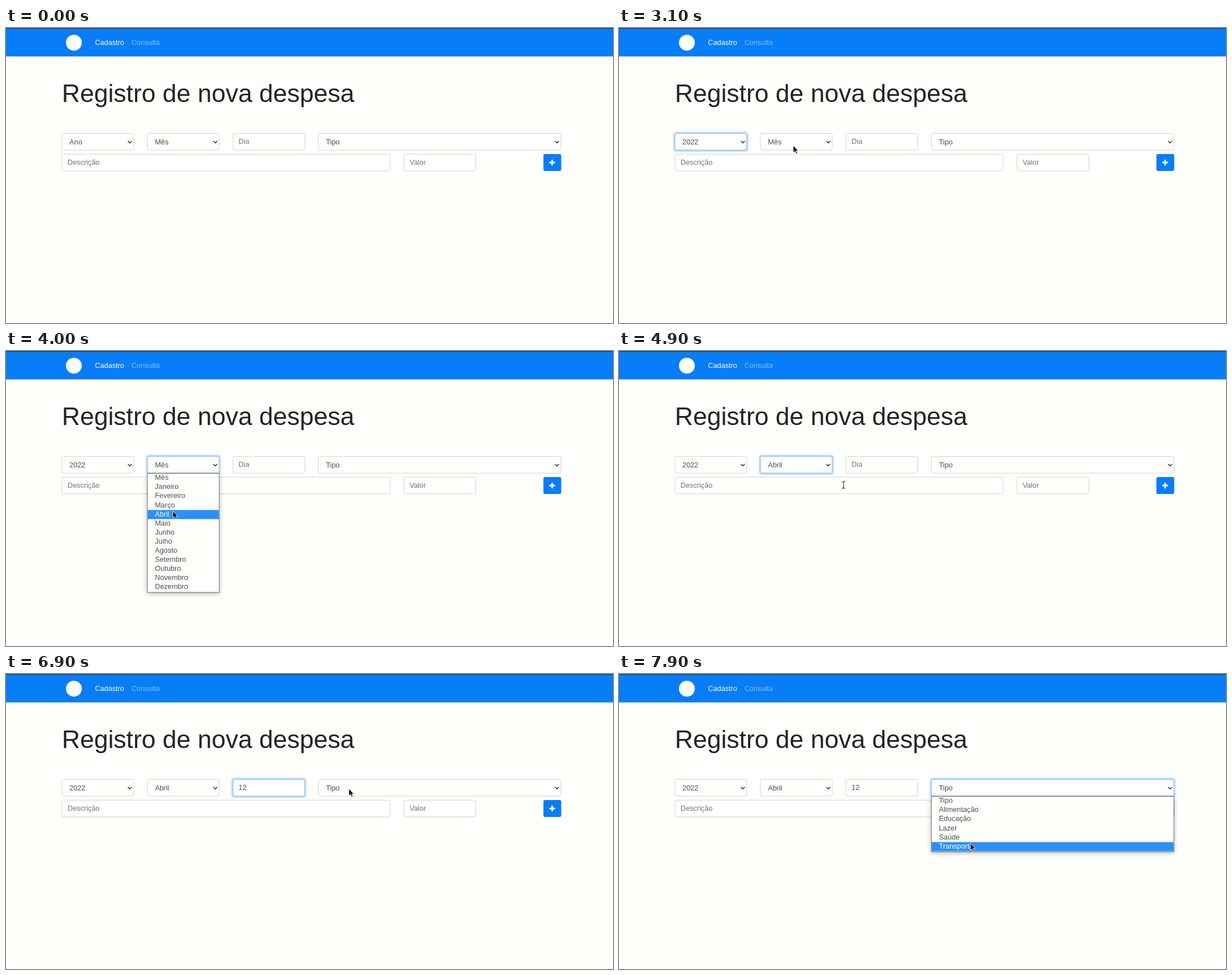
Recreate the animation shown at these times as an HTML page. Size 1073x522 px, loop 8000 ms.

```html
<!DOCTYPE html>
<html lang="pt-BR">
<head>
<meta charset="utf-8">
<style>
  html, body { margin: 0; width: 100%; height: 100%; overflow: hidden; background: #fffffc; }
  svg { display: block; font: 12.73px "Liberation Sans", Arial, sans-serif; fill: #495057; }
  .field { fill: #fffffc; stroke: #ced4da; }
  .hint { fill: #6c757d; }
  .chevron { fill: none; stroke: #343a40; stroke-width: 1.6; }
  .popup { fill: #fffffc; stroke: #6b6b6b; filter: drop-shadow(0 2px 4px rgba(0,0,0,.28)); }
</style>
</head>
<body>
<svg id="stage" width="1073" height="522" viewBox="0 0 1073 522"></svg>
<script>
const LOOP = 8000, STEP = 100, BLUE = '#087df8';
const LEFT = 98.8, COLUMN = 151.15, FIELD_TOP = 186.5, FIELD_H = 29.6;
const ROW = 16.07, LIST_TOP = 217.1;
const stage = document.getElementById('stage');

// Each field: where the pointer aims, when it arrives, clicks, hovers the option and leaves
const fields = [
  { list: 'Ano 2022', pick: 1, aim: [169, 194], optionX: 185, reach: 2100, click: 2300, hover: 2700, leave: 2800 },
  { list: 'Mês Janeiro Fevereiro Março Abril Maio Junho Julho Agosto Setembro Outubro Novembro Dezembro',
    pick: 4, aim: [308, 208], optionX: 295, reach: 3100, click: 3200, hover: 4000, leave: 4500 },
  { aim: [463, 207], reach: 5200, click: 5300, leave: 6600 },
  { list: 'Tipo Alimentação Educação Lazer Saúde Transporte', pick: 5, aim: [606, 203], optionX: 621,
    reach: 6900, click: 7000, overshoot: [7500, 614, 329], hover: 7900, leave: LOOP }
];

// Pointer route as time, x, y
const route = [[700, 521, 152], [1300, 149, 50]];
fields.forEach((f, i) => {
  f.x = LEFT + COLUMN * i;
  f.w = i < 3 ? 127 : 428.7;
  f.blur = i < 3 ? fields[i + 1].click : LOOP * 2;
  route.push([f.reach, ...f.aim], [f.click, ...f.aim]);
  if (f.overshoot) route.push(f.overshoot);
  let rest = f.aim;
  if (f.list) {
    f.list = f.list.split(' ');
    rest = [f.optionX, LIST_TOP + f.pick * ROW + 1.8];
    route.push([f.hover, ...rest]);
  }
  route.push([f.leave, ...rest]);
});

const clamp = (v, lo, hi) => Math.min(hi, Math.max(lo, v));
const ease = u => u * u * (3 - 2 * u);
const isOpen = (f, t) => f.list && t >= f.click && t < f.leave;
const inside = (x, y, x0, y0, x1, y1) => x > x0 && x < x1 && y > y0 && y < y1;
const text = (s, x, y, attrs = '') => `<text x="${x}" y="${y}" ${attrs}>${s}</text>`;
const rect = (x, y, w, h, attrs) => `<rect x="${x}" y="${y}" width="${w}" height="${h}" ${attrs}/>`;
const box = (x, y, w) => rect(x, y, w, FIELD_H, 'rx="3" class="field"');

function pointerAt(t) {
  if (t < route[0][0]) return null;
  const i = route.findIndex(p => p[0] > t);
  const [t0, x0, y0] = route[i - 1], [t1, x1, y1] = route[i];
  const k = ease((t - t0) / (t1 - t0));
  return [x0 + (x1 - x0) * k, y0 + (y1 - y0) * k];
}

function pointer([x, y], listOpen) {
  const overText = !listOpen && (inside(x, y, 98, 90, 982, 142) ||
    inside(x, y, 401, 186, 528, 217) || inside(x, y, 98, 223, 679, 253));
  const shape = overText
    ? '<path d="M-3 -6H-1L0 -5L1 -6H3M0 -5V5M-3 6H-1L0 5L1 6H3" fill="none" stroke="#222" stroke-width="1.1"/>'
    : '<path d="M0 0V12.5L3 10L5.2 14.5L7.2 13.5L5.2 9.2H8.8Z" fill="#111" stroke="#fff" stroke-width=".8"/>';
  return `<g transform="translate(${x} ${y})">${shape}</g>`;
}

function focusRing({ x, w, click, blur }, t) {
  const fade = at => clamp((t - at + 50) / 150, 0, 1);
  const alpha = fade(click) - fade(blur);
  if (alpha <= 0) return '';
  return `<g fill="none" opacity="${alpha}">` +
    rect(x - 1.6, FIELD_TOP - 1.6, w + 3.2, FIELD_H + 3.2, 'rx="4" stroke="#bfdefd" stroke-width="2.6"') +
    rect(x, FIELD_TOP, w, FIELD_H, 'rx="3" stroke="#80bdff"') + '</g>';
}

function topField(f, t) {
  const frame = box(f.x, FIELD_TOP, f.w) + focusRing(f, t);
  if (f.list) {
    return frame + text(f.list[t >= f.leave ? f.pick : 0], f.x + 13.3, 206) +
      `<path class="chevron" d="M${f.x + f.w - 10.3} 200l3.4 3.4l3.4 -3.4"/>`;
  }
  const day = '12'.slice(0, clamp(Math.floor((t - 6000) / 200), 0, 2));
  const blinkStart = day ? 6200 : f.click;
  const caret = t >= f.click && t < f.blur && (t - blinkStart) % 1000 < 500;
  return frame + text(day || 'Dia', f.x + 10, 205.2, day ? '' : 'class="hint"') +
    (caret ? rect(f.x + 9.7 + day.length * 7.08, 195, 1, 13, 'fill="#495057"') : '');
}

function popup({ x, w, list }, y) {
  const hover = clamp(Math.floor((y + 2.5 - LIST_TOP) / ROW), 0, list.length - 1);
  return rect(x, 216.6, w, list.length * ROW + 1.6, 'class="popup"') +
    rect(x + .5, LIST_TOP + hover * ROW, w - 1, ROW, 'fill="#2a90f8"') +
    list.map((s, i) => text(s, x + 13.3, 228.3 + i * ROW, i === hover ? 'fill="#fff"' : '')).join('');
}

const page =
  rect(0, 0, 1073, 522, 'fill="#fffffc"') +
  rect(0, 0, 1073, 50.3, `fill="${BLUE}"`) +
  rect(0, 0, 1073, 1.2, 'fill="#34373c"') +
  '<circle cx="120" cy="26" r="14" fill="#fff"/>' +
  text('Cadastro', 157.3, 30.2, 'fill="#fff"') +
  text('Consulta', 221.7, 30.2, 'fill="#fff" fill-opacity=".5"') +
  text('Registro de nova despesa', LEFT, 131, 'font-size="44.5" fill="#212529"') +
  box(LEFT, 223.2, 580.2) + text('Descrição', LEFT + 10, 241.8, 'class="hint"') +
  box(LEFT + COLUMN * 4, 223.2, 127) + text('Valor', LEFT + COLUMN * 4 + 10, 241.8, 'class="hint"') +
  rect(950, 222.9, 31.5, 30.2, `rx="3" fill="${BLUE}"`) +
  '<path d="M961.7 238h7.6M965.5 234.2v7.6" stroke="#fff" stroke-width="3" stroke-linecap="round"/>';

function render(t) {
  const at = pointerAt(t);
  const open = fields.find(f => isOpen(f, t));
  stage.innerHTML = page + fields.map(f => topField(f, t)).join('') +
    (open ? popup(open, at[1]) : '') + (at ? pointer(at, open) : '');
}

let shown = -1;
const began = performance.now();
function tick() {
  const t = Math.floor((performance.now() - began) % LOOP / STEP) * STEP;
  if (t !== shown) render(shown = t);
  requestAnimationFrame(tick);
}
tick();
</script>
</body>
</html>
```
